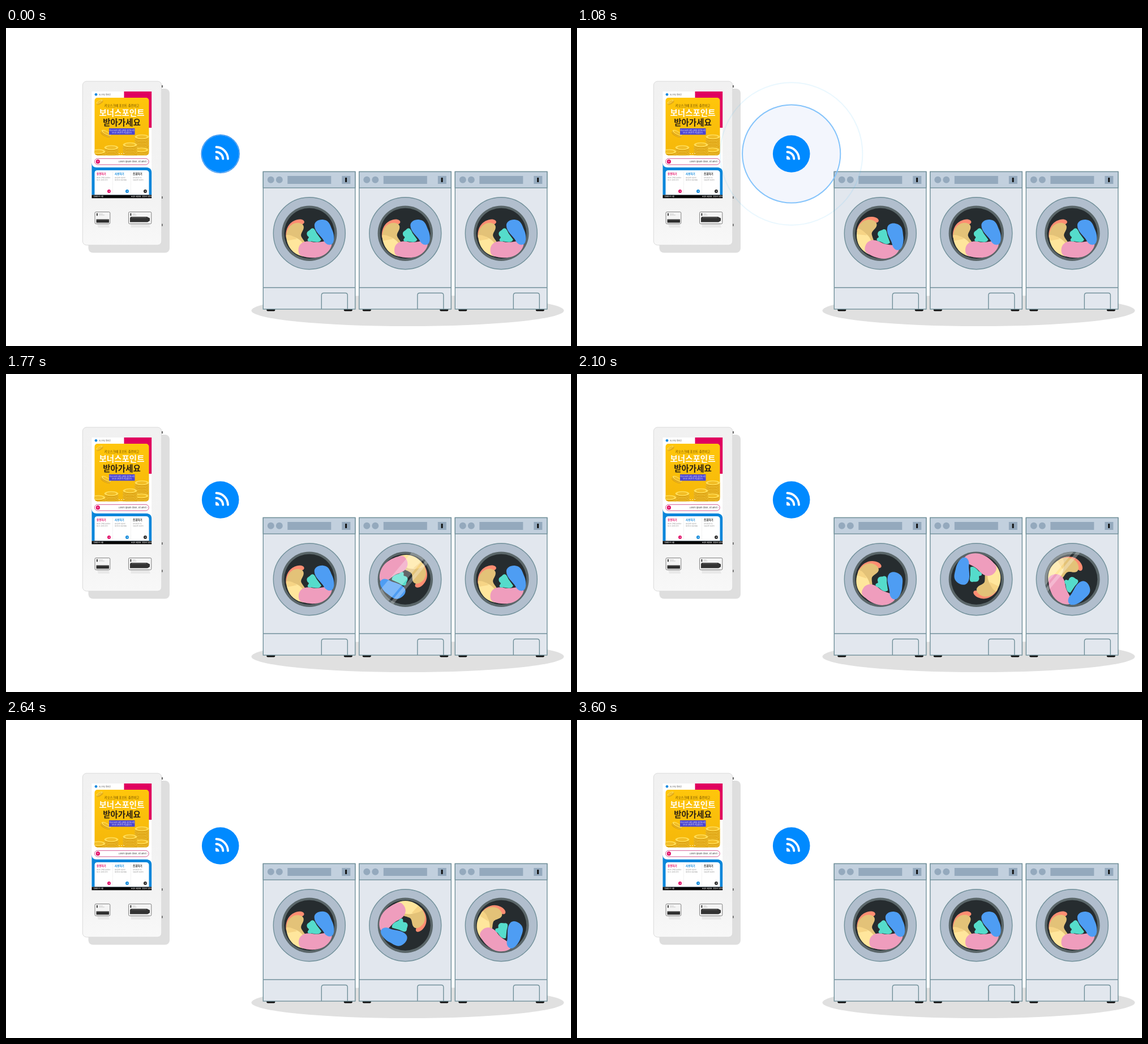
Write an HTML page that moves like this. It is 998 px wide and 561 px high and loops after 4500 ms.

```html
<!DOCTYPE html>
<html lang="ko">
<head>
<meta charset="utf-8">
<title>Laundry kiosk</title>
<style>
html, body { margin: 0; width: 100%; height: 100%; overflow: hidden; background: #fff; }
svg { display: block; width: 998px; height: 561px; }
text { font-family: "Noto Sans CJK KR", "Noto Sans CJK", "Noto Sans", sans-serif; }
.edge { stroke: #71909a; stroke-width: 1.4; }
.grey { fill: #94a9bd; }
.tiny { font-size: 3.1px; fill: #777; }
.card { font-size: 4.5px; font-weight: 700; }
</style>
</head>
<body>
<svg viewBox="0 0 998 561" xmlns="http://www.w3.org/2000/svg">
  <defs>
    <linearGradient id="gold" x2="0" y2="1">
      <stop stop-color="#ffc60b"/><stop offset="1" stop-color="#f5b70a"/>
    </linearGradient>
    <linearGradient id="shell" x2="0" y2="1">
      <stop stop-color="#f1f1f1"/><stop offset=".75" stop-color="#f3f3f3"/><stop offset="1" stop-color="#f8f8f8"/>
    </linearGradient>
    <clipPath id="glass"><circle r="48.5"/></clipPath>
    <clipPath id="banner"><rect x="156.500" y="123" width="96" height="101.500" rx="5"/></clipPath>
    <g id="coin">
      <path d="M-12.500 0V4.500A12.500 4.300 0 0 0 12.500 4.500V0Z" fill="#d99a08"/>
      <path d="M-12.500 2.500A12.500 4.300 0 0 0 12.500 2.500" fill="none" stroke="#f8d34a"/>
      <ellipse rx="12.500" ry="4.300" fill="#ffdc55"/>
      <ellipse rx="9" ry="2.800" fill="#f2bd25"/>
    </g>
    <g id="body">
      <path d="M6 242.500h15v1.500q0 2-2 2h-11q-2 0-2-2zM142.500 242.500h15v1.500q0 2-2 2h-11q-2 0-2-2z" fill="#111"/>
      <rect class="edge" width="162.500" height="242.500" fill="#e2e7ee"/>
      <rect class="edge" width="162.500" height="28.500" fill="#c2d0de"/>
      <g class="grey">
        <circle cx="13.500" cy="14.300" r="6"/><circle cx="28.500" cy="14.300" r="6"/>
        <rect x="43" y="7.500" width="77" height="14"/>
        <rect x="139" y="7.500" width="15" height="14"/>
      </g>
      <rect x="144.800" y="10.500" width="3" height="8" rx=".8" fill="#111"/>
      <path class="edge" d="M0 204.500H162.500M103 242.500V218q0-4 4-4H145q4 0 4 4V242.500" fill="none"/>
      <circle class="edge" cx="81.500" cy="108.700" r="63.500" fill="#b1becd"/>
      <circle cx="81.500" cy="108.700" r="48.700" fill="#5a6669"/>
      <circle cx="81.500" cy="108.700" r="44.500" fill="#262c2f"/>
    </g>
    <g id="clothes">
      <path d="M-41 8C-43-4-38-20-22-24C-14-26-8-23-9-19C-11-14-20-15-25-10Z" fill="#ff8d72"/>
      <path d="M-41 5C-40-6-36-13-28-17C-20-20-11-18-10-12C-9-5-17 0-14 6C-10 14-4 16-9 24L-30 22Z" fill="#e3c278"/>
      <path d="M-41 4C-30 4-16 9-11 19C-7 27-5 36-9 41C-27 39-40 25-41 4Z" fill="#ffe69c"/>
      <path d="M-41 3C-35 2-27 5-22 10L-39 13Z" fill="#f6d485"/>
      <path d="M-19 26C-17 16-6 12 5 15C15 18 27 12 40 14C41 25 33 35 22 40C10 45-4 43-13 40C-19 38-20 32-19 26Z" fill="#ef9dbd"/>
      <path d="M-4 3C-6-4 0-4 3-8C8-11 10-6 13 0L21 11C18 18 9 15 4 14C-2 16-5 12-2 9C1 6-3 6-4 3Z" fill="#55dccb"/>
      <path d="M9-14C9-21 17-25 25-24C35-23 37-14 40-7C44 1 45 13 41 18C36 23 28 19 25 12C21 5 9-3 9-14Z" fill="#4e9df3"/>
    </g>
  </defs>

  <rect width="998" height="561" fill="#fff"/>
  <ellipse cx="709.500" cy="498.500" rx="276" ry="27.500" fill="#e0e0e0"/>
  <g id="washers"></g>

  <g id="kiosk">
    <path d="M274 101h2.500v4h-2.500zM274 297h2.500v4h-2.500zM274 345.500h2.500v4h-2.500z" fill="#555"/>
    <rect x="145.500" y="107" width="143.500" height="289.500" rx="8" fill="#dedede"/>
    <path d="M275 101h1.600v4h-1.600zM275 297h1.600v4h-1.600zM275 345.500h1.600v4h-1.600z" fill="#444"/>
    <rect x="135.300" y="94" width="139.500" height="289" rx="7" fill="url(#shell)" stroke="#dadada"/>
    <rect x="151.500" y="112" width="105.700" height="188" fill="#fff"/>
    <path d="M208.500 112h48.700v64h-48.700z" fill="#e0005f"/>
    <circle cx="159" cy="117.300" r="2.400" fill="#1c8be0"/>
    <text x="164" y="118.700" class="tiny" style="fill:#555">포근마당 빨래방</text>

    <rect x="156.500" y="123" width="96" height="101.500" rx="5" fill="url(#gold)"/>
    <g id="coins" clip-path="url(#banner)"></g>
    <g text-anchor="middle">
      <text x="204.500" y="139.300" font-size="5.300" fill="#634400">키오스크에 포인트 충전하고</text>
      <g font-size="14.500" font-weight="900">
        <text x="204.500" y="155" fill="#fff">보너스포인트</text>
        <text x="204.500" y="171.700" fill="#2b2113">받아가세요</text>
      </g>
      <rect x="182" y="177" width="45.500" height="11.300" fill="#4b45d2"/>
      <g font-size="3" fill="#fff">
        <text x="204.700" y="181.800">키오스크로 10만 금액을 충전하시면</text>
        <text x="204.700" y="186.300">보너스 포인트가 지급됩니다</text>
      </g>
    </g>
    <path d="M199 221.500h2m2 0h2m2 0h2" stroke="#fff" stroke-width="1.200" opacity=".7"/>

    <rect x="156.500" y="230.300" width="95.700" height="10.800" rx="5.400" fill="#fff" stroke="#cf4a86" stroke-width=".9"/>
    <circle cx="162.300" cy="235.700" r="3.600" fill="#e0005f"/>
    <circle cx="162.300" cy="235.500" r="1.200" fill="none" stroke="#fff" stroke-width=".6"/>
    <text x="250" y="237.200" font-size="3.700" text-anchor="end" fill="#333">Lorem ipsum dolor, sit amet ›</text>

    <path d="M151.500 238Q152 246 160 246H248Q257.200 246.500 257.200 255V294.500H151.500Z" fill="#0a86da"/>
    <path d="M156.500 294.500V256q0-5 5-5H247q5.500 0 5.500 5V294.500Z" fill="#fff"/>
    <path d="M188.500 254V291M220.500 254V291" stroke="#ccc" stroke-width=".5" stroke-dasharray="1 1"/>
    <g id="cards"></g>
    <path d="M151.500 294.500h105.700v5.700h-105.700z" fill="#080808"/>
    <g font-size="2.600" font-weight="700" fill="#fff">
      <text x="154.500" y="298.400">안내데스크 이용</text>
      <text x="221" y="298.400">포인트 이용안내</text>
      <text x="240.500" y="298.400">충전하기 설명서</text>
    </g>

    <path d="M161 346h20l2 6h-20zM220 346h33l2 6h-34z" fill="#e8e8e8"/>
    <g fill="#f4f4f4" stroke="#777" stroke-width=".9">
      <rect x="157" y="324.500" width="26.800" height="21" rx="2"/>
      <rect x="216.500" y="324.500" width="40.300" height="21" rx="2"/>
    </g>
    <path d="M160 326.800h1.800v4.500h-1.800zM219.500 326.800h1.800v4.500h-1.800zM159.500 337.500h22.500v6h-22.500z" fill="#2d2d2d"/>
    <path d="M219 342.500V336q0-3 3-3H249l5 2.500V340l-4 2.500Z" fill="#333"/>
    <path d="M160 338h21.500M222 334.500H248" stroke="#777" stroke-width=".8"/>
    <path d="M164 328h7m-7 2h10M223.500 328h5m-5 2h7" stroke="#bbb" stroke-width=".7"/>
  </g>

  <g id="rings"></g>
  <circle cx="378.700" cy="222" r="32.800" fill="#008aff"/>
  <g fill="none" stroke="#fff" stroke-width="3.900" stroke-linecap="round">
    <path d="M371.500 218.800A12.300 12.300 0 0 1 383.300 230.800M371.500 210A21.200 21.200 0 0 1 392 230.800"/>
  </g>
  <path d="M370 225.500q6.200.5 6.700 6.700h-4.700q-2 0-2-2z" fill="#fff"/>
</svg>

<script>
const LOOP = 4500, STEP = 30;
const byId = id => document.getElementById(id);
const add = (parent, markup) => {
  parent.insertAdjacentHTML('beforeend', markup);
  return parent.lastElementChild;
};

// Coin piles: x, top y, height
[[240, 192, 5], [186, 211, 3], [163, 218, 2], [239, 215, 2], [219, 206, 4]].forEach(([x, y, n]) => {
  while (n--) add(byId('coins'), `<use href="#coin" x="${x}" y="${y + n * 5.2}"/>`);
});
add(byId('coins'), '<use href="#coin" transform="translate(165 130) rotate(-28) scale(.5)"/>');
add(byId('coins'), '<use href="#coin" transform="translate(177 185) rotate(28) scale(.75)"/>');

[['충전하기', '#e0005f', '포인트 금액을 충전하고', '보너스 포인트 받기'],
 ['사용하기', '#0a86da', '충전금액 사용하기', '포인트로 이용하세요'],
 ['조회하기', '#222', '나의 포인트 및', '사용내역 조회하기']].forEach(([head, color, a, b], i) => {
  const x = 160 + i * 32;
  add(byId('cards'), `<g>
    <text x="${x}" y="259.300" class="card" fill="${color}">${head}</text>
    <text x="${x}" y="265.300" class="tiny" style="font-size:2.500px">${a}</text>
    <text x="${x}" y="269.300" class="tiny" style="font-size:2.500px">${b}</text>
    <circle cx="${x + 22}" cy="288" r="3" fill="${color}"/>
    <path d="M${x + 20.5} 288h3m-1.200-1.200l1.200 1.200l-1.200 1.200" fill="none" stroke="#fff" stroke-width=".6"/>
  </g>`);
});

const washers = [0, 1, 2].map(i => {
  const x = 454.3 + i * 169.5;
  const g = add(byId('washers'), `<g transform="translate(${x} 253.500)">
    <use href="#body"/>
    <g transform="translate(81.500 108.700)">
      <use class="load" href="#clothes"/>
      <g clip-path="url(#glass)"><g class="shine" fill="#fff" opacity=".28">
        <path d="M-15-75h24v150h-24zM13-75h6v150h-6z"/>
      </g></g>
    </g>
  </g>`);
  return { start: 930 + i * 420, load: g.querySelector('.load'), shine: g.querySelector('.shine') };
});

const rings = [
  { r: 43, stroke: '#2688ee', width: 1.2, fill: 'rgba(0,60,170,.055)' },
  { r: 86.6, stroke: '#85c4fb', width: 2, fill: 'rgba(20,80,210,.052)' },
  { r: 125.7, stroke: 'rgba(60,180,245,.11)', width: 2, fill: 'none' }
].map((ring, i) => ({
  ...ring, enter: -56 + i * 300, leave: 780 + i * 300,
  el: add(byId('rings'), `<circle cx="378.700" cy="222" fill="${ring.fill}" stroke="${ring.stroke}" stroke-width="${ring.width}"/>`)
})).reverse();
rings.forEach(ring => byId('rings').append(ring.el));

const clamp = x => Math.min(1, Math.max(0, x));
const backOut = x => 1 + 2.70158 * (x - 1) ** 3 + 1.70158 * (x - 1) ** 2;

// Drum angle over time since start: four turns, quick in, longer out
const spin = [[0, 0], [150, 16], [330, 70], [450, 185], [750, 576], [870, 762],
  [1170, 1108], [1290, 1222], [1530, 1390], [1740, 1440]];
const slope = i => {
  if (i === 0 || i === spin.length - 1) return 0;
  const [a, b] = [spin[i - 1], spin[i + 1]];
  return (b[1] - a[1]) / (b[0] - a[0]);
};
function angle(t) {
  if (t <= 0 || t >= 1740) return 0;
  const i = spin.findIndex(k => k[0] > t) - 1;
  const [t0, a] = spin[i], [t1, b] = spin[i + 1];
  const d = t1 - t0, u = (t - t0) / d, v = 1 - u;
  return v * v * (1 + 2 * u) * a + u * u * (3 - 2 * u) * b
    + d * u * v * (v * slope(i) - u * slope(i + 1));
}

function draw(t) {
  for (const { el, r, enter, leave } of rings) {
    const scale = t < leave ? backOut(clamp((t - enter) / 240)) : backOut(clamp(1 - (t - leave) / 240));
    el.setAttribute('r', Math.max(0, r * scale));
    el.style.display = scale > .01 ? '' : 'none';
  }
  for (const { start, load, shine } of washers) {
    const local = t - start, x = (local - 440) * .35;
    load.setAttribute('transform', `rotate(${angle(local)})`);
    shine.setAttribute('transform', `rotate(40) translate(${x} 0)`);
    shine.style.display = Math.abs(x) < 75 ? '' : 'none';
  }
}

const origin = performance.now();
function tick() {
  const t = (performance.now() - origin) % LOOP;
  draw(Math.floor(t / STEP) * STEP);
  requestAnimationFrame(tick);
}
tick();
</script>
</body>
</html>
```
